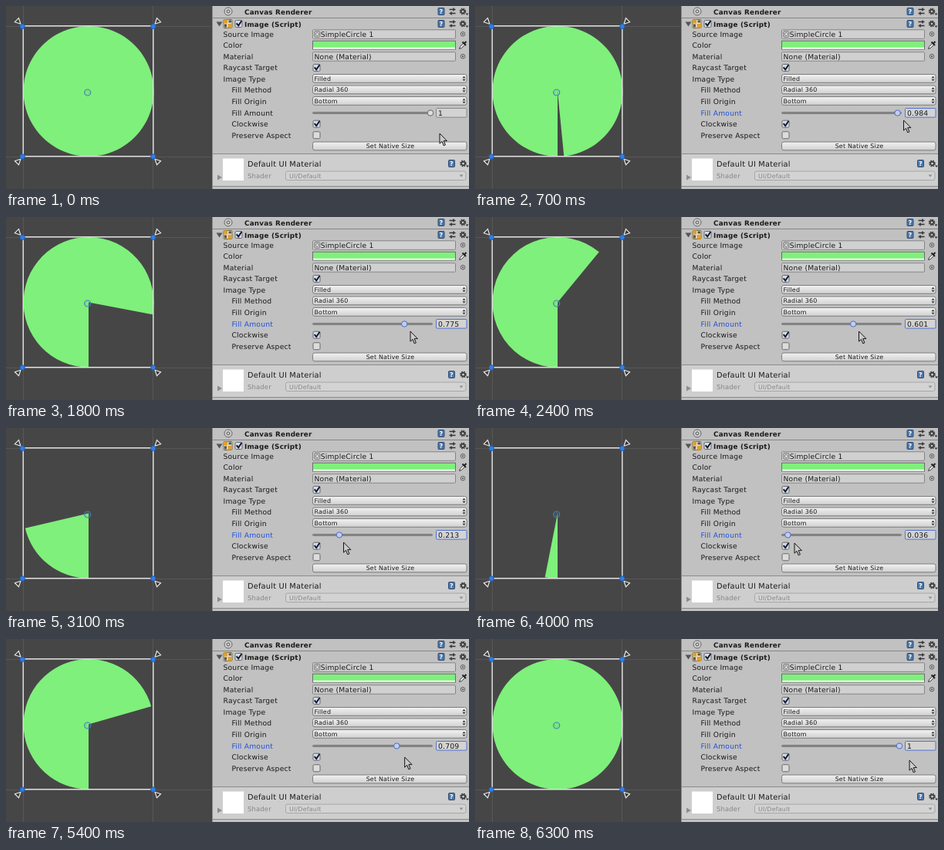
Write an HTML page that moves like this. It is 600 by 237 pixels and loops after 6500 ms.

```html
<!DOCTYPE html>
<html lang="en">
<head>
<meta charset="utf-8">
<title>Radial fill inspector</title>
<style>
  html, body { margin: 0; width: 100%; height: 100%; overflow: hidden; background: #c1c1c1; }
  svg { display: block; width: 600px; height: 237px; }
  text { font: 9.2px "DejaVu Sans", sans-serif; letter-spacing: .2px; fill: #1a1a1a; text-rendering: geometricPrecision; }
  .bold { font-size: 8.8px; font-weight: 700; }
  .mini { font-size: 7.9px; }
  .dim { fill: #858585; }
  .focus { fill: #2450d8; }
</style>
</head>
<body>
<svg id="stage" viewBox="0 0 600 237"></svg>
<script>
const rect = (x, y, w, h, fill, stroke = 'none', r = 0, extra = '') =>
  `<rect x="${x}" y="${y}" width="${w}" height="${h}" rx="${r}" fill="${fill}" stroke="${stroke}" ${extra}/>`;
const circle = (x, y, r, fill, stroke = 'none', extra = '') =>
  `<circle cx="${x}" cy="${y}" r="${r}" fill="${fill}" stroke="${stroke}" ${extra}/>`;
const path = (d, fill, stroke = 'none', extra = '') =>
  `<path d="${d}" fill="${fill}" stroke="${stroke}" ${extra}/>`;
const text = (x, y, s, cls = '', extra = '') =>
  `<text x="${x}" y="${y}" class="${cls}" ${extra}>${s}</text>`;

const field = y => rect(397.5, y - 5.5, 185, 11.5, '#d0d0d0', '#858585', 1);
const picker = y => circle(592, y, 2.8, 'none', '#555', 'stroke-width=".9"') + circle(592, y, 1, '#444');
const arrows = (x, y) => path(`M${x - 2} ${y - .8}h4l-2-2.4zM${x - 2} ${y + .8}h4l-2 2.4z`, '#333');
const button = y => rect(397.5, y - 5.5, 199.5, 10.8, 'url(#face)', '#7c7c7c', 2.5);
const popup = (y, s) => button(y) + text(399.5, y + 2.8, s, 'mini') + arrows(593.5, y);
const check = (x, y, on) => rect(x + .5, y - 4.5, 9, 9, on ? '#d5dce8' : '#dcdcdc', '#686868', 1.5) +
  (on ? path(`M${x + 2.2} ${y - .6}l2.5 3 4.3-6.4`, 'none', '#10182c', 'stroke-width="1.9"') : '');
const book = (x, y) => rect(x - 4, y - 4.5, 8, 9, '#4c76a8', '#304c70', 1) +
  text(x, y + 3.1, '?', 'bold', 'text-anchor="middle" style="font-size:8px;fill:#fff"');
const sliders = (x, y) => path(`M${x - 4} ${y - 2.5}h8M${x - 4} ${y + 2.5}h8M${x + 1.5} ${y - 4.5}v4M${x - 1.5} ${y + .5}v4`,
  'none', '#333', 'stroke-width="1.5"');
const gear = (x, y) => circle(x, y, 3, 'none', '#3c3c3c', 'stroke-width="2.6" stroke-dasharray="1.5 .86"') +
  circle(x, y, 2.2, 'none', '#3c3c3c', 'stroke-width="1.4"') + path(`M${x + 3.5} ${y + 2.5}h4l-2 2.5z`, '#333');
const mirrored = draw => [[1, 1], [-1, 1], [1, -1], [-1, -1]]
  .map(([sx, sy]) => `<g transform="translate(106 110.7) scale(${sx} ${sy})">${draw}</g>`).join('');

const labels = ['Source Image', 'Color', 'Material', 'Raycast Target', 'Image Type', 'Fill Method',
  'Fill Origin', 'Fill Amount', 'Clockwise', 'Preserve Aspect'];
const rowY = i => 36.3 + i * 14.55;
const green = '#7ff07b';

const scene = rect(0, 0, 267, 237, '#474647') +
  path('M22.5 0V237M190.5 0V237M0 26.5H266M0 195.5H266', 'none', '#575757') +
  path('', green, 'none', 'id="pie"') +
  rect(22.3, 25.8, 168.5, 168.9, 'none', '#e0e0e0', 0, 'stroke-width="1.5"') +
  circle(105.7, 112, 4, 'none', '#3f83b4', 'stroke-width="1.2"') +
  circle(105.7, 112, 2.2, 'none', '#5f9bbd', 'stroke-width=".8" opacity=".45"') +
  mirrored(path('M-87-87.5L-94.5-90L-89.5-95Z', '#3a3a3a', '#e8e8e8', 'stroke-width="1.2"') +
    circle(-84.8, -84.3, 3.2, '#2f7fe6', '#1c57ae', 'stroke-width=".8"'));

const headers = path('M268 15.5H600', 'none', '#858585') +
  circle(288, 7, 5, '#cfcfcf', '#666') + circle(288, 7, 2, 'none', '#555') +
  text(309, 10.6, 'Canvas Renderer', 'bold') +
  path('M272.5 20.5h8l-4 6z', '#555') +
  rect(282, 17.5, 11, 11, '#e9e2cf', '#7d6a40', 1) +
  path('M282 17.5h5v5h-5zM287.5 23h5.5v5.5h-5.5z', '#dda02f') + path('M283 23.5h3v4h-3zM288.5 18.5h3.5v3h-3.5z', '#5e5547') +
  check(296.5, 23, true) + text(309, 26.5, 'Image (Script)', 'bold') +
  [7, 23].map(y => book(564, y) + sliders(578.5, y) + gear(592, y)).join('');

const rows = labels.map((s, i) => text(i > 4 ? 292.5 : 281.5, rowY(i) + 3.4, s, '', i === 7 ? 'id="amount"' : '')).join('') +
  field(36.3) + rect(399.8, 32.7, 7, 7.6, '#c9c9c9', '#777', 1) + circle(403.3, 36.5, 1.9, '#eee', '#777') +
  text(407.7, 39.7, 'SimpleCircle 1') + picker(36.3) +
  rect(397.5, 45.2, 185, 10.8, green, '#6c6c6c') + rect(398, 53.8, 184, 1.8, '#fff') +
  path('M587.5 55.5l1-3 4.5-4.5 2 2-4.5 4.5z', '#ddd', '#333', 'stroke-width=".9"') +
  path('M591.5 46.5l4.5 4.5M594 48.5l2.5-2.5', 'none', '#222', 'stroke-width="2"') +
  field(65.2) + text(399.5, 68.7, 'None (Material)') + picker(65.2) +
  check(397.5, rowY(3), true) +
  popup(94, 'Filled') + popup(108.5, 'Radial 360') + popup(123, 'Bottom') +
  rect(397.5, 137.5, 155, 2, '#8f8f8f', '#6c6c6c', 1, 'stroke-width=".8"') +
  circle(0, 138.5, 3.7, '#dedede', '#666', 'id="knob"') +
  rect(557.5, 132.5, 39.5, 11.6, '#d3d3d3', '#888', 1, 'id="box"') +
  text(560, 141.7, '', '', 'id="value"') +
  check(397.5, rowY(8), true) + check(397.5, rowY(9), false) +
  button(181.5) + text(498, 184.4, 'Set Native Size', 'mini', 'text-anchor="middle"');

const material = rect(268, 192, 332, 41.5, '#cecece') +
  path('M268 191.5H600M268 233.5H600', 'none', '#8b8b8b') +
  rect(281, 197.5, 27, 28.5, '#fff') +
  text(313, 207.8, 'Default UI Material', '', 'style="font-size:9.8px"') +
  book(577.5, 204) + gear(592.5, 204) +
  path('M274 218.5v7l6-3.5z', '#8d8d8d') + text(313, 222.7, 'Shader', 'dim', 'style="font-size:8.4px"') +
  rect(362.5, 214, 233.5, 11.5, '#d3d3d3', '#a6a6a6', 2.5) +
  text(367, 222.6, 'UI/Default', 'mini dim') + path('M587.5 218.5h5l-2.5 3z', '#8d8d8d');

const pointer = path('M0 0V13.2L3 10.4L5.2 15.8L7.4 14.9L5.2 9.6H9.4Z', '#cbcbcb', '#151515', 'id="pointer"');

const stage = document.getElementById('stage');
stage.innerHTML =
  '<defs><linearGradient id="face" x2="0" y2="1"><stop stop-color="#f2f2f2"/><stop offset="1" stop-color="#d0d0d0"/></linearGradient></defs>' +
  scene + rect(267, 0, 333, 237, '#c1c1c1') + path('M267.5 0V237', 'none', '#8a8a8a') +
  headers + rows + material + pointer;

const [pie, knob, box, value, amount, cursor] =
  ['pie', 'knob', 'box', 'value', 'amount', 'pointer'].map(id => document.getElementById(id));

// time, slider value, drawn fill, pointer x, pointer y
const keys = [
  [0, 1, 1, 562, 165], [200, 1, 1, 562, 163], [600, 1, 1, 558, 148],
  [1200, .903, .906, 543, 148], [1800, .775, .78, 524, 148], [2400, .601, .61, 497.5, 148],
  [2800, .434, .436, 472, 148], [3100, .213, .213, 437.5, 148], [3500, .095, .1, 421, 148],
  [3800, .026, .026, 411, 149], [4000, .036, .031, 414, 149], [4300, .105, .1, 425, 149],
  [4700, .353, .353, 464.5, 149.5], [5000, .52, .517, 488, 151], [5600, .803, .8, 531, 154],
  [6100, 1, 1, 561, 157], [6300, 1, 1, 563, 157]
];
const LOOP = 6500, STEP = 100, PRESS = 600;

function pose(t) {
  const i = Math.max(1, keys.findIndex(k => k[0] >= t));
  const a = keys[i - 1], b = keys[i], p = (t - a[0]) / (b[0] - a[0]);
  return a.map((n, j) => n + (b[j] - n) * p);
}

function wedge(fill) {
  const cx = 107, cy = 110.4, r = 84.4;
  if (fill >= 1) return `M${cx} ${cy + r}a${r} ${r} 0 1 1 .01 0z`;
  const a = fill * 2 * Math.PI;
  return `M${cx} ${cy}V${cy + r}A${r} ${r} 0 ${+(fill > .5)} 1 ${cx - r * Math.sin(a)} ${cy + r * Math.cos(a)}Z`;
}

function draw(now) {
  const t = Math.min(Math.floor(now % LOOP / STEP) * STEP, 6300);
  const [, v, fill, x, y] = pose(t);
  const focused = t >= PRESS;
  pie.setAttribute('d', wedge(fill));
  knob.setAttribute('cx', 400 + 150 * v);
  knob.setAttribute('fill', focused ? '#c3cdec' : '#dedede');
  knob.setAttribute('stroke', focused ? '#4a6cc8' : '#666');
  box.setAttribute('stroke', focused ? '#5573d2' : '#888');
  amount.setAttribute('class', focused ? 'focus' : '');
  value.textContent = +v.toFixed(3);
  cursor.setAttribute('transform', `translate(${x} ${y})`);
  requestAnimationFrame(() => draw(performance.now() - start));
}
const start = performance.now();
draw(0);
</script>
</body>
</html>
```
